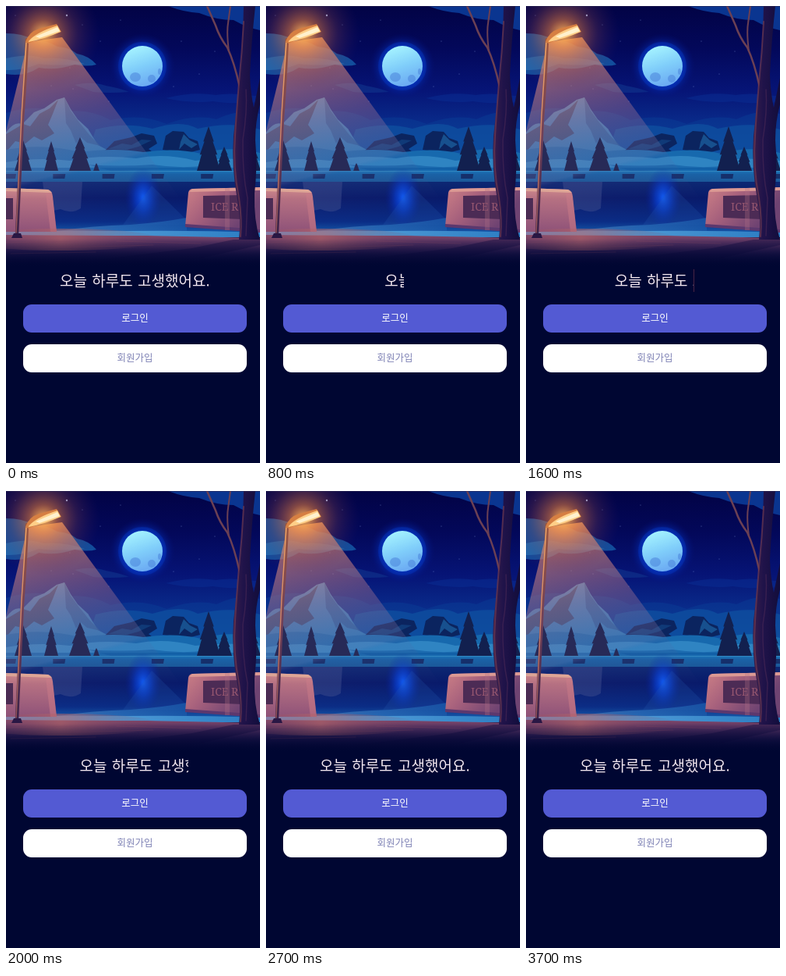
Recreate the animation shown at these times as an HTML page with a canvas. Size 326 by 585 pixels, loop 3800 ms.

```html
<!DOCTYPE html>
<html lang="ko">
<head>
<meta charset="utf-8">
<title>Night rink</title>
<style>
html, body { margin: 0; width: 100%; height: 100%; overflow: hidden; background: #000632; }
body { position: relative; font-family: "Noto Sans CJK KR", "Noto Sans CJK", sans-serif; }
canvas { position: absolute; left: 0; top: 0; width: 326px; height: 585px; }
#line {
  position: absolute; top: 337px; height: 29px; box-sizing: border-box;
  overflow: hidden; white-space: nowrap; border-right: 1px solid transparent;
  font-size: 19px; font-weight: 500; line-height: 28px; word-spacing: 1px; color: #f4e8f0;
}
.btn {
  position: absolute; left: 22px; width: 287px; height: 36px; border-radius: 11px;
  text-align: center; font-size: 12.5px; line-height: 34px;
}
#login { top: 382px; background: #535ad3; color: #fff; font-weight: 500; }
#join { top: 433px; background: #fff; color: #7d80b4; }
</style>
</head>
<body>
<canvas id="scene"></canvas>
<div id="line">오늘 하루도 고생했어요.</div>
<div class="btn" id="login">로그인</div>
<div class="btn" id="join">회원가입</div>
<script>
const canvas = document.getElementById('scene');
const line = document.getElementById('line');
const ratio = window.devicePixelRatio || 1;
canvas.width = 326 * ratio;
canvas.height = 585 * ratio;
const c = canvas.getContext('2d');
c.scale(ratio, ratio);

function fill(d, color, alpha = 1) {
  c.globalAlpha = alpha;
  c.fillStyle = color;
  c.fill(new Path2D(d));
  c.globalAlpha = 1;
}

function stroke(d, color, width, alpha = 1) {
  c.globalAlpha = alpha;
  c.strokeStyle = color;
  c.lineWidth = width;
  c.lineCap = 'round';
  c.stroke(new Path2D(d));
  c.globalAlpha = 1;
}

function stops(g, list) {
  list.forEach(([at, color]) => g.addColorStop(at, color));
  return g;
}
const linear = (x0, y0, x1, y1, ...list) => stops(c.createLinearGradient(x0, y0, x1, y1), list);
const radial = (x, y, r0, r1, ...list) => stops(c.createRadialGradient(x, y, r0, x, y, r1), list);

function oval(x, y, rx, ry, color, alpha = 1) {
  c.globalAlpha = alpha;
  c.fillStyle = color;
  c.beginPath();
  c.ellipse(x, y, rx, ry, 0, 0, Math.PI * 2);
  c.fill();
  c.globalAlpha = 1;
}

function pine(x, top, base, half, color) {
  const h = base - top;
  let d = `M${x} ${top}`;
  for (const side of [1, -1]) {
    const at = (k, w) => `L${x + side * half * w} ${top + h * k}`;
    const edge = [at(.34, .45), at(.34, .36), at(.64, .75), at(.63, .6), at(1, 1)];
    d += (side > 0 ? edge : edge.reverse()).join('');
  }
  fill(d + 'Z', color);
}

function sky() {
  fill('M0 0H326V225H0Z', linear(0, 0, 0, 215,
    [0, '#020345'], [.25, '#03085a'], [.5, '#061476'], [.75, '#0a318f'], [1, '#1161ac']));
  fill('M208 0Q229 8 248 9Q270 18 292 18Q310 28 326 31V0Z', '#0a3590');
  fill('M0 35Q22 35 34 43Q54 44 66 52Q82 53 91 61Q107 64 116 75Q105 78 88 75Q64 83 42 79Q24 91 0 87Z', '#1459a6', .85);
  fill('M0 67Q30 60 48 67Q76 65 101 74Q65 77 42 74Q20 83 0 82Z', '#2a7fc0', .55);
  fill('M88 101Q110 96 128 102Q146 105 158 110Q132 112 112 110Z', '#123d92', .5);
  fill('M205 118Q240 109 269 114Q288 110 326 116V123Q290 126 266 122Q236 125 205 118Z', '#0b2f93', .5);
  fill('M0 137Q36 125 74 136Q104 130 134 146Q174 137 206 151Q242 138 270 145Q298 131 326 138V185H0Z', '#0b3c96', .5);
  fill('M115 158Q154 148 188 157Q225 145 246 157Q290 147 326 158V190H105Z', '#0f52a2', .7);
  const stars = [[78, 12], [98, 24], [121, 45], [82, 79], [58, 102], [105, 158], [147, 18],
    [225, 45], [248, 87], [268, 58], [215, 103], [132, 122], [12, 12], [86, 106]];
  stars.forEach(([x, y], i) => oval(x, y, i ? .6 : 1.2, i ? .6 : 1.2, '#a9c4ff', i ? .5 : .9));
}

function moon() {
  oval(175, 77, 42, 42, radial(175, 77, 25, 42,
    [0, 'rgba(5,60,210,.75)'], [.45, 'rgba(4,36,160,.4)'], [1, 'rgba(4,16,120,0)']));
  oval(175, 77, 31, 31, '#0736bd', .4);
  oval(175, 77, 26, 26, linear(165, 52, 182, 103, [0, '#a5f3ff'], [.5, '#80cefa'], [1, '#6aa8f2']));
  const craters = [[166, 91, 7, 6], [187, 93, 5, 5], [197, 84, 2, 4]];
  craters.forEach(([x, y, rx, ry]) => oval(x, y, rx, ry, '#4b83db', .55));
}

function hills() {
  fill('M0 162Q10 147 21 151L36 136L49 131L65 120L75 117L83 132L92 145L105 157L118 178L143 191V212H0Z',
    linear(0, 118, 0, 211, [0, '#3f7fbe'], [1, '#1d73b4']));
  fill('M0 164L22 151L31 154L43 138L56 131L67 120L60 138L54 152L62 163L46 172L36 167L25 176L12 173L0 187Z', '#2a4677', .9);
  fill('M75 117L83 134L94 149L108 166L121 179L104 175L96 168L90 176L83 159L77 150Z', '#1f5a9d', .75);
  fill('M126 186L139 173L161 168L174 163L190 166L194 176L183 183L192 190H126Z', '#0b245f');
  fill('M131 183L149 176L161 178L174 171L187 172L170 180L155 184Z', '#12407f', .8);
  fill('M201 184L205 166L214 160L228 161L235 169L246 173L249 184L230 189Z', '#0b245f');
  fill('M228 164L236 172L246 177L238 182L229 176L222 184L224 174Z', '#1a5b9a', .8);
  fill('M0 184Q48 175 95 187Q140 181 176 187Q218 181 250 189Q286 178 326 188V213H0Z', '#1769ae');
  fill('M0 200Q40 193 82 198Q120 190 167 195Q203 188 243 198Q280 193 326 198V207H0Z', '#3489c6', .85);
  fill('M105 203Q145 206 188 203Q220 208 251 205L246 210Q186 208 138 212Z', '#0f5aa4', .6);
}

function pines() {
  const dark = '#12204f', warm = '#272a57';
  pine(22, 172, 211, 11, warm);
  pine(58, 173, 211, 9, warm);
  pine(95, 168, 211, 14, warm);
  pine(116, 201, 211, 4, warm);
  pine(260, 154, 211, 15, dark);
  pine(280, 180, 211, 10, dark);
  pine(314, 168, 211, 13, dark);
}

function rink() {
  fill('M0 211H326V225H0Z', linear(0, 211, 0, 225, [0, '#1d77ba'], [.3, '#1a62a6'], [1, '#1b5899']));
  fill('M0 211H326V212H0Z', '#3185bf');
  for (let x = -3; x < 320; x += 63.3) fill(`M${x} 215h16l-1 6h-15Z`, '#152f6b');
  fill('M0 225H326V294H0Z', linear(0, 225, 0, 293, [0, '#0d2873'], [.3, '#081a6a'], [.75, '#0a2c85'], [1, '#1760ae']));
  fill('M47 225H98L96 259Q84 267 70 260L52 264Z', '#41508f', .45);
  c.save();
  c.translate(176, 245);
  c.scale(.62, 1);
  oval(0, 0, 38, 38, radial(0, 0, 2, 38, [0, 'rgba(16,95,255,.85)'], [.4, 'rgba(6,64,222,.6)'], [1, 'rgba(5,28,152,0)']));
  c.restore();
  fill('M187 230L238 280H150Z', '#2a62b4', .2);
  fill('M60 289Q110 281 160 280Q200 277 232 271V291H60Z', linear(60, 0, 232, 0, [0, '#4a78b4'], [.5, '#2a6db8'], [1, '#1b5aaa']), .75);
  fill('M0 288Q80 287 157 288Q238 287 326 290V296H0Z', linear(0, 0, 326, 0, [0, '#7e8fc0'], [.4, '#4f9bd6'], [1, '#2b7cc2']));
}

function walls() {
  fill('M0 233L54 235Q59 236 60 244L65 289H0Z', linear(0, 233, 0, 289, [0, '#d98f8b'], [.25, '#bc7381'], [1, '#8f5278']));
  fill('M0 233L54 235L59 239L0 237Z', '#eaae97');
  fill('M0 246H9V273H0Z', '#49294f');
  fill('M51 239L59 239L65 289H57Z', '#d4808a', .45);
  fill('M240 234L326 232V290L230 282L234 239Q235 234 240 234Z', linear(230, 233, 290, 288, [0, '#cd8086'], [.45, '#a8627d'], [1, '#6f4372']));
  fill('M239 234L326 232V236L235 238Z', '#dc9a94');
  fill('M230 279L326 286V290L230 283Z', '#5c386e');
  fill('M253 243L304 242V273L253 271Z', '#4c2b55');
  fill('M281 233H287V287H281Z', '#b27286', .3);
  c.font = '14px "Noto Serif", serif';
  c.fillStyle = '#95566f';
  c.fillText('ICE R', 263, 262);
}

function ground() {
  fill('M0 293Q110 294 181 294L326 297V337H0Z', linear(0, 294, 0, 335,
    [0, '#7d4668'], [.22, '#573362'], [.58, '#24194e'], [1, '#000632']));
  oval(70, 299, 130, 14, radial(70, 299, 0, 130, [0, 'rgba(186,104,105,.6)'], [1, 'rgba(120,64,99,0)']));
  stroke('M0 303L92 301M41 310L189 306M142 301L250 304M6 317L115 315', '#8a4b66', 1, .35);
  fill('M292 299H326V306L222 329H85L239 310Z', '#160f40', .45);
}

function beam() {
  fill('M28 46L72 40L238 266L225 290H0V160Z', linear(48, 35, 112, 282,
    [0, 'rgba(255,177,106,.85)'], [.17, 'rgba(226,140,118,.62)'], [.43, 'rgba(172,116,141,.42)'],
    [.7, 'rgba(121,117,170,.24)'], [.72, 'rgba(102,82,143,.1)'], [1, 'rgba(95,77,140,0)']));
}

function lamp() {
  oval(48, 36, 72, 72, radial(48, 36, 1, 72,
    [0, 'rgba(255,184,90,.95)'], [.25, 'rgba(238,128,62,.55)'], [.6, 'rgba(150,72,77,.25)'], [1, 'rgba(80,35,90,0)']));
  const post = 'M27 43Q25 90 21 145L14 292';
  stroke(post, linear(0, 43, 0, 293, [0, '#9a5540'], [.5, '#6f4058'], [1, '#3a2148']), 4.5);
  stroke('M26 47L20 140L13 290', linear(0, 43, 0, 293, [0, '#f0a868'], [.5, '#c9806a'], [1, '#8d5058']), 1.5);
  fill('M10 291H19L21 297H7Z', '#291744');
  fill('M25 46Q29 33 43 29L65 23L71 33L40 43L29 48Z', '#d67f42');
  fill('M29 45Q38 34 66 25L70 33Q50 42 29 46Z', '#ffcf88');
  fill('M38 39L66 27L69 32L43 41Z', '#fff1cd');
}

function tree() {
  const bark = linear(290, 0, 326, 0, [0, '#3a1f4b'], [.4, '#20134a'], [1, '#120d3c']);
  stroke('M300 104Q293 72 284 53Q274 40 269 25L258 0', '#6b4054', 2.5);
  stroke('M286 58Q283 34 285 22L288 0', '#6b4054', 2);
  fill('M305 0H320Q315 45 313 88Q314 112 318 130L326 92V126Q320 148 320 172Q323 205 319 240Q318 275 326 299H299Q302 274 297 248Q289 206 292 166Q296 132 300 92Q304 50 305 0Z', bark);
  stroke('M305 20Q303 60 299 98Q296 134 294 166Q291 206 299 246Q303 272 301 295', '#6e3a50', 2, .7);
  stroke('M308 107Q310 134 304 171Q303 212 310 246L308 294', '#4a2855', 1.5, .6);
}

[sky, moon, hills, rink, walls, ground, beam, pines, lamp, tree].forEach(draw => draw());
// Blend the picture into the page
fill('M0 294H326V338H0Z', linear(0, 298, 0, 333, [0, 'rgba(0,6,50,0)'], [1, '#000632']));
stroke('M0 .5H326', '#34315b', 1, .6);

const LOOP = 3800, START = 515, TYPING = 2000, STEPS = 30, FULL = 192, MIDDLE = 165;

function frame(now) {
  const t = now % LOOP;
  const typed = t < START ? 1 : Math.min(1, Math.floor((t - START) / TYPING * STEPS) / STEPS);
  const width = FULL * typed;
  line.style.width = width + 'px';
  line.style.left = MIDDLE - width / 2 + 'px';

  const blink = t % 1000;
  const color = blink < 220 || blink >= 660 ? 'transparent' : blink < 400 ? '#fff' : '#492343';
  line.style.borderRightColor = color;
  line.style.visibility = width ? 'visible' : 'hidden';
  requestAnimationFrame(frame);
}
frame(0);
</script>
</body>
</html>
```
